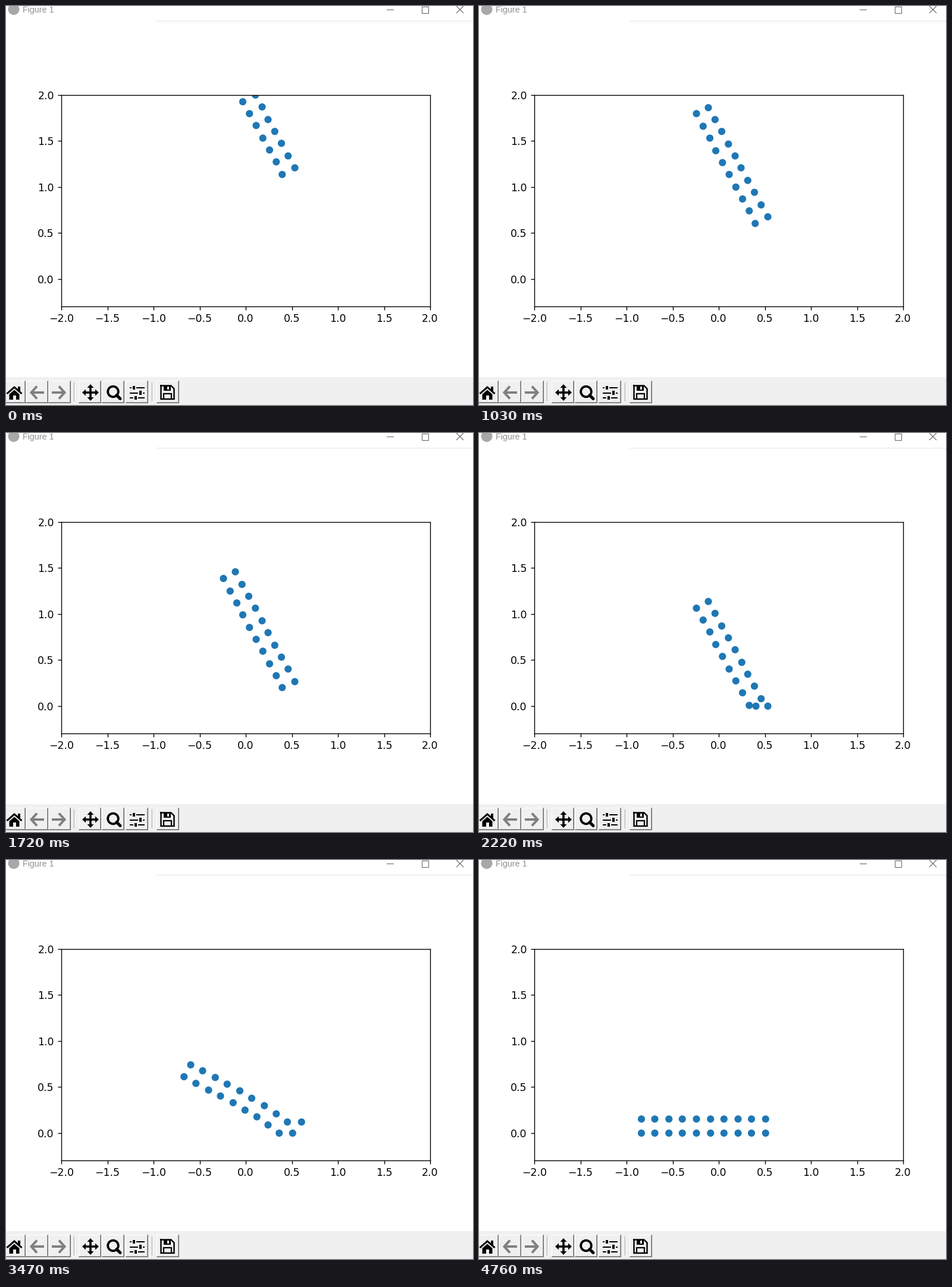
Write a matplotlib script that moves like this. It is 785 px wide and 672 px high and loops after 5550 ms.

```python
import numpy as np
import matplotlib.pyplot as plt
from matplotlib.animation import FuncAnimation
from matplotlib.patches import Circle, Polygon, Rectangle

WIDTH, HEIGHT, DPI = 785, 672, 125
LOOP_MS, FRAME_MS, STEP_MS, LAST_STEP = 5550, 30, 49.78, 96
PX = 72 / DPI

# Motion is measured in stage pixels (x + 1j * y, y down) and simulation steps.
FLOOR = 460
SPACING = 23.25
TILT = np.radians(61.6)
TOUCH, SWING_START, SWING_FULL, SWING_END = 42, 48, 59, 91
ZOOM, ORIGIN = 1.25, -7 + 25j  # the window is magnified, so dots sit on a coarse grid

fig = plt.figure(figsize=(WIDTH / DPI, HEIGHT / DPI), dpi=DPI, facecolor="white")
stage = fig.add_axes([0, 0, 1, 1])
stage.set_xlim(0, WIDTH)
stage.set_ylim(HEIGHT, 0)
stage.set_autoscale_on(False)
stage.axis("off")


def box(x0, y0, x1, y1, color="black"):
    stage.add_patch(Rectangle((x0, y0), x1 - x0, y1 - y0, fc=color, lw=0))


def shape(points, color="black"):
    stage.add_patch(Polygon(points, closed=True, fc=color, lw=0))


def stroke(points, width, color="black", cap="butt"):
    xs, ys = zip(*points)
    stage.plot(xs, ys, color=color, lw=width * PX, solid_capstyle=cap,
               solid_joinstyle="miter")


def button(x0, width, y0=631, y1=669):
    x1 = x0 + width
    box(x0, y0, x1, y1, "#696969")
    box(x0, y0, x1 - 1, y1 - 1, "white")
    box(x0 + 1, y0 + 1, x1 - 1, y1 - 1, "#a0a0a0")
    box(x0 + 1, y0 + 1, x1 - 2, y1 - 2, "#f0f0f0")


def draw_title_bar():
    stage.add_patch(Circle((13, 5.5), 9.5, fc="#a8a8a8", lw=0))
    stage.text(28, 11, "Figure 1", color="#909090", size=14.3 * PX,
               family="Liberation Sans", va="baseline")
    box(253, 25, WIDTH, 26, "#e3e3e3")
    gray = "#606060"
    box(640, 6, 652, 7, gray)
    stage.add_patch(Rectangle((698.5, 0.5), 11, 11, fc="none", ec=gray, lw=PX))
    stroke([(757, 0), (769, 12)], 1.1, gray)
    stroke([(757, 12), (769, 0)], 1.1, gray)


def draw_home():
    stroke([(1.5, 653), (14, 642), (26.5, 653)], 3)
    box(20, 641, 23.5, 649)
    shape([(5.5, 654), (14, 646.5), (22.5, 654), (22.5, 663), (5.5, 663)])
    box(11.5, 656, 16.5, 663, "#f0f0f0")


def draw_arrow(tip, direction):
    gray = "#808080"
    back = tip + 12 * direction
    stroke([(back, 640.5), (tip + 2.5 * direction, 651), (back, 661.5)], 4, gray)
    stroke([(tip + 4 * direction, 651), (tip + 24 * direction, 651)], 4, gray)


def draw_pan(cx=142, cy=651):
    stroke([(cx - 10, cy), (cx + 10, cy)], 3.6)
    stroke([(cx, cy - 10), (cx, cy + 10)], 3.6)
    head = np.array([14, 8 + 5.5j, 8 - 5.5j])
    for turn in (1, 1j, -1, -1j):
        shape([(cx + p.real, cy + p.imag) for p in head * turn])


def draw_zoom():
    stage.add_patch(Circle((180, 649.5), 8.8, fc="none", ec="black", lw=3.8 * PX))
    stroke([(186, 655.5), (192, 661.5)], 5, cap="round")


def draw_sliders():
    for y, knob in ((643, 215), (651.5, 226), (660, 218)):
        box(208, y - 1, 233, y + 1)
        box(knob - 4, y - 2, knob + 4, y + 2, "#f0f0f0")
        box(knob - 2, y - 3.2, knob + 2, y + 3.2)


def draw_save():
    stroke([(260.5, 639.5), (277.5, 639.5), (282.5, 644.5), (282.5, 662),
            (260.5, 662), (260.5, 639.5)], 2.4, cap="projecting")
    box(264.5, 639, 276.5, 648)
    box(270.5, 641, 274, 646, "#f0f0f0")
    stroke([(265, 661), (265, 653), (278, 653), (278, 661)], 2.2)


def draw_toolbar():
    box(0, 625, WIDTH, HEIGHT, "#f0f0f0")
    for first, count, pitch in ((-5, 3, 38), (122, 3, 39.5), (253, 1, 38)):
        for i in range(count):
            button(int(first + i * pitch), 38)
    for x in (114, 245):
        box(x, 634, x + 1, 666, "#a0a0a0")
        box(x + 1, 634, x + 2, 666, "white")
    draw_home()
    draw_arrow(40, 1)
    draw_arrow(101, -1)
    draw_pan()
    draw_zoom()
    draw_sliders()
    draw_save()


def falling(step):
    """Rigid tilted bar under gravity, clamped at the floor."""
    depth = 283.5 + 3.56 * step + 0.0173 * step ** 2
    link = SPACING * np.exp(1j * TILT)
    row = 464.8 + 1j * depth - link * np.arange(9, -1, -1)
    rows = np.array([row, row - 1j * link])
    return rows.real + 1j * np.minimum(rows.imag, FLOOR)


def swinging(step):
    """Bar tipping over its foot; the lower links lag behind and bend it."""
    p = np.clip((step - SWING_START) / (SWING_END - SWING_START), 0, 1)
    along = np.minimum(np.arange(10) / 7, 1)
    bend = 9.5 * p * (1 - p) ** 3 * np.radians(16 * along ** 3 - 3.4)
    links = SPACING * np.exp(1j * (TILT * (1 - p) + bend))
    foot = 481.8 - 5.5 * np.sin(2 * np.pi * p) + 1j * FLOOR
    reach = np.cumsum(links[7::-1])[::-1] + SPACING
    row = np.append(foot - reach, [foot - SPACING, foot])
    return np.array([row, row - 1j * links])


def particles(step):
    grip = np.clip((step - TOUCH) / (SWING_FULL - TOUCH), 0, 1) ** 2
    points = ((1 - grip) * falling(min(step, SWING_START))
              + grip * swinging(step)).ravel()
    cells = (points - ORIGIN) / ZOOM
    return np.round(cells) * ZOOM + ORIGIN


draw_title_bar()
draw_toolbar()

ax = fig.add_axes([93 / WIDTH, 1 - 506.25 / HEIGHT, 620 / WIDTH, 356.5 / HEIGHT])
ax.set_xlim(-2, 2)
ax.set_ylim(-0.3, 2)
ax.set_autoscale_on(False)
ax.set_xticks(np.arange(-2, 2.1, 0.5))
ax.set_yticks(np.arange(0, 2.1, 0.5))
dots = [ax.add_patch(Circle((0, 0), 6.08, fc="#1f77b4", lw=0,
                            transform=stage.transData))
        for _ in range(20)]


def update(frame):
    elapsed = frame * FRAME_MS + 20
    step = np.clip(np.floor((elapsed - 30) / STEP_MS) + 1, 0, LAST_STEP)
    for dot, point in zip(dots, particles(step)):
        dot.center = point.real, point.imag
    return dots


anim = FuncAnimation(fig, update, frames=LOOP_MS // FRAME_MS, interval=FRAME_MS,
                     repeat=True, repeat_delay=0)
plt.show()
```
